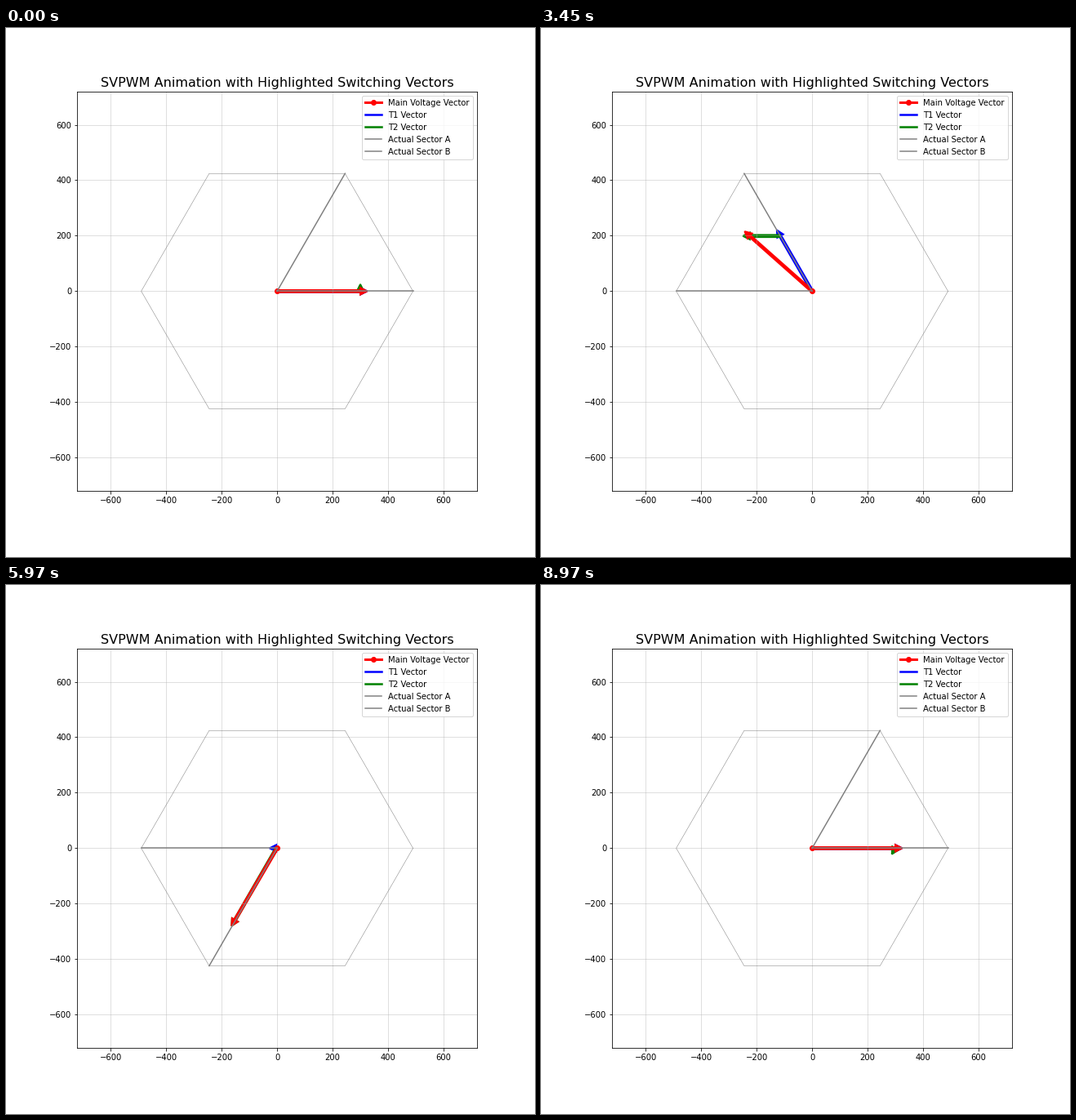
A matplotlib script that plays this animation: 648x648 px, repeating every 9000 ms.

```python
import numpy as np
import matplotlib.pyplot as plt
from matplotlib.animation import FuncAnimation

STEPS = 300
V_DC = 600
AMP = V_DC / 2
RADIUS = V_DC * np.sqrt(2 / 3)
LIMIT = 1.2 * V_DC
WEDGE = np.pi / 3

fig, ax = plt.subplots(figsize=(9, 9), dpi=72)
fig.subplots_adjust(left=0.125, right=0.9, bottom=0.125, top=0.88)
ax.set_xlim(-LIMIT, LIMIT)
ax.set_ylim(-LIMIT, LIMIT)
ax.set_aspect("equal")
ax.grid(True, alpha=0.5)
ax.set_title("SVPWM Animation with Highlighted Switching Vectors", fontsize=16)


def polar(r, angle):
    return r * np.cos(angle), r * np.sin(angle)


def make_arrow(color):
    return ax.arrow(0, 0, 1, 0, width=8, head_width=25, head_length=25,
                    fc=color, ec=color, lw=2)


ax.plot(*polar(RADIUS, np.arange(7) * WEDGE), color="gray", lw=0.5)
ax.plot([0], [0], "ro-", lw=3, label="Main Voltage Vector")
ax.plot([], [], "b-", lw=2.5, label="T1 Vector")
ax.plot([], [], "g-", lw=2.5, label="T2 Vector")
side_a, = ax.plot([], [], color="gray", lw=1.5, label="Actual Sector A")
side_b, = ax.plot([], [], color="gray", lw=1.5, label="Actual Sector B")
ax.legend(loc="upper right")

t1_arrow, t2_arrow, main_arrow = map(make_arrow, ("blue", "green", "red"))


def set_arrow(arrow, tail, vec):
    arrow.set_data(x=tail[0], y=tail[1], dx=vec[0], dy=vec[1])


def update(k):
    theta = 2 * np.pi * k / (STEPS - 1)
    sector = 6 * k // (STEPS - 1) % 6
    low, high = sector * WEDGE, (sector + 1) * WEDGE

    # Split the main vector along both sides of its sector
    t1 = AMP * np.sin(high - theta) / np.sin(WEDGE)
    t2 = AMP * np.sin(theta - low) / np.sin(WEDGE)
    v1, v2 = polar(t1, low), polar(t2, high)

    set_arrow(t1_arrow, (0, 0), v1)
    set_arrow(t2_arrow, v1, v2)
    set_arrow(main_arrow, (0, 0), polar(AMP, theta))
    for line, angle in ((side_a, low), (side_b, high)):
        x, y = polar(RADIUS, angle)
        line.set_data([0, x], [0, y])
    return t1_arrow, t2_arrow, main_arrow, side_a, side_b


anim = FuncAnimation(fig, update, frames=STEPS, interval=30,
                     repeat=True, repeat_delay=0, blit=False)
plt.show()
```
